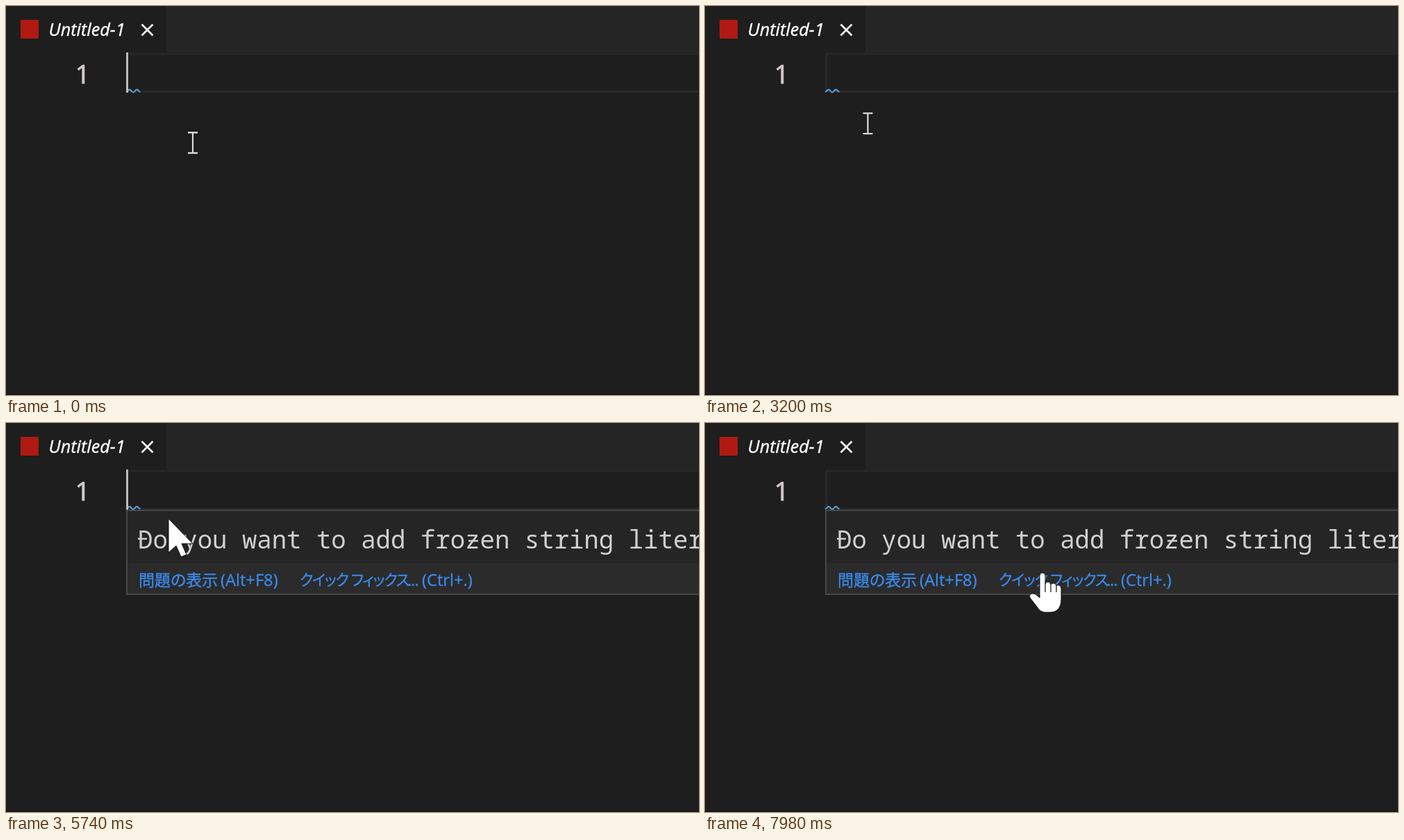
Recreate the animation shown at these times as an HTML page. Size 998 px wide and 561 px high, loop 8000 ms.

```html
<!DOCTYPE html>
<html lang="ja">
<head>
<meta charset="utf-8">
<title>Editor hint</title>
<style>
  html, body { margin: 0; width: 100%; height: 100%; overflow: hidden; background: #1e1e1e; }
  svg { display: block; width: 100%; height: 100%; }
  .title { font: italic 25.4px "Open Sans", "Noto Sans", sans-serif; fill: #fff; stroke: #fff; stroke-width: .4; }
  .number { font: 38px "Noto Sans", "Open Sans", sans-serif; fill: #cfcaca; stroke: #cfcaca; stroke-width: .6; }
  .message { font: 35.7px "Noto Sans Mono", "DejaVu Sans Mono", monospace; fill: #d0d0d0; }
  .links { font: 23.7px "Open Sans", "Noto Sans", sans-serif; fill: #3a8cf0; stroke: #3a8cf0; stroke-width: .3; }
  .kanji, .kana { font-family: "Noto Sans CJK JP", sans-serif; font-feature-settings: "palt"; }
  .kanji { font-size: 23px; }
  .kana { font-size: 21.5px; letter-spacing: -1.2px; }
  .pointer { fill: #fff; stroke: #111; stroke-width: 1; }
</style>
</head>
<body>
<svg viewBox="0 0 998 561" preserveAspectRatio="none">
  <rect width="998" height="561" fill="#1e1e1e"/>
  <rect x="231" width="767" height="67" fill="#252526"/>
  <rect y="560" width="998" height="1" fill="#111"/>

  <rect x="21" y="20" width="26" height="27" fill="#b01a12"/>
  <text class="title" x="61.500" y="43">Untitled-1</text>
  <path d="M195.500 26.500l16 16m0-16l-16 16" stroke="#f0f0f0" stroke-width="2.700"/>

  <path d="M1000 69H174.500V123.500H1000" fill="none" stroke="#282828" stroke-width="3"/>
  <text class="number" x="99.500" y="112">1</text>
  <path d="M173 124l2.400-1.500q2.600-4 5.200 0t5.200 0 5.200 0l2.500 1.500" fill="none" stroke="#5da5dc" stroke-width="2"/>
  <rect id="caret" x="173" y="67" width="3" height="58" fill="#bcbcbc"/>

  <g id="hint">
    <rect x="174" y="126" width="830" height="121" fill="#252526"/>
    <rect x="174" y="202" width="830" height="45" fill="#2b2b2c"/>
    <rect x="174" y="126" width="830" height="121" fill="none" stroke="#474747" stroke-width="2"/>
    <text class="message" x="190" y="181">Do you want to add frozen string literal</text>
    <path d="M190 167h13M666 170h14" stroke="#d0d0d0" stroke-width="2.500"/>
    <g class="links">
      <text class="kanji" x="191" y="235">問題の表示</text>
      <text x="309" y="234.500">(Alt+F8)</text>
      <text class="kana" x="423" y="234">クイック</text>
      <text class="kana" x="497" y="234">フィックス</text>
      <text x="578" y="234.500" letter-spacing="-1.200">...</text>
      <text x="599" y="234.500">(Ctrl+.)</text>
    </g>
  </g>

  <g id="cursor">
    <g id="beam" fill="none">
      <path d="M-7-15H7M-7 15H7M0-15V15" stroke="#111" stroke-width="4"/>
      <path d="M-7-14.500H7M-7 15H7M0-14V14" stroke="#dcdcdc" stroke-width="2.300"/>
    </g>
    <path id="arrow" class="pointer" d="M0 0V49L11 39 18 55 26 52 19 36H35Z"/>
    <g id="hand">
      <path class="pointer" d="M-4 4Q-4 0 0 0T4 4V16Q5 13 8 13T12 17Q13 15 16 15T20 19Q21 17 24 18T27 23V38Q27 48 22 53 18 57 12 57H2Q-4 56-8 49L-18 36Q-20 31-15 30-11 29-4 36Z"/>
      <path d="M4 15V28M12 17V28M20 19V28" stroke="#222" stroke-width="1.300"/>
    </g>
  </g>
</svg>
<script>
const LOOP = 8000;
const HINT_AT = 4460, ARROW_AT = 5220;
const LINK_LEFT = 424;
const BLINK = 1000;
const PAUSE_AT = 6500, RESUME_AT = 7400; // the caret rests hidden in between

const HOME = { x: 269, y: 197 };
const MOVES = [
  { from: 2800, to: 3640, x: 195, y: 137 },
  { from: 5200, to: 5740, x: 234, y: 138 },
  { from: 5740, to: 6460, x: 420, y: 204 },
  { from: 6620, to: 7460, x: 486, y: 216 }
];

const el = id => document.getElementById(id);
const show = (id, on) => el(id).setAttribute("visibility", on ? "visible" : "hidden");
const progress = (t, from, to) => Math.max(0, Math.min(1, (t - from) / (to - from)));
const ease = k => k * k * (3 - 2 * k);

function pointerAt(t) {
  return MOVES.reduce((p, move) => {
    const k = ease(progress(t, move.from, move.to));
    return { x: p.x + (move.x - p.x) * k, y: p.y + (move.y - p.y) * k };
  }, HOME);
}

function caretVisible(t) {
  const phase = (t < PAUSE_AT ? t + 300 : t - RESUME_AT) % BLINK;
  return phase >= 0 && phase < BLINK / 2;
}

function render(t) {
  const { x, y } = pointerAt(t);
  const onLink = x >= LINK_LEFT;
  show("caret", caretVisible(t));
  el("hint").setAttribute("opacity", progress(t, HINT_AT, HINT_AT + 120));
  el("cursor").setAttribute("transform", `translate(${x} ${y})`);
  show("beam", t < ARROW_AT);
  show("arrow", t >= ARROW_AT && !onLink);
  show("hand", onLink);
}

const start = performance.now();
function tick() {
  render((performance.now() - start) % LOOP);
  requestAnimationFrame(tick);
}
tick();
</script>
</body>
</html>
```
